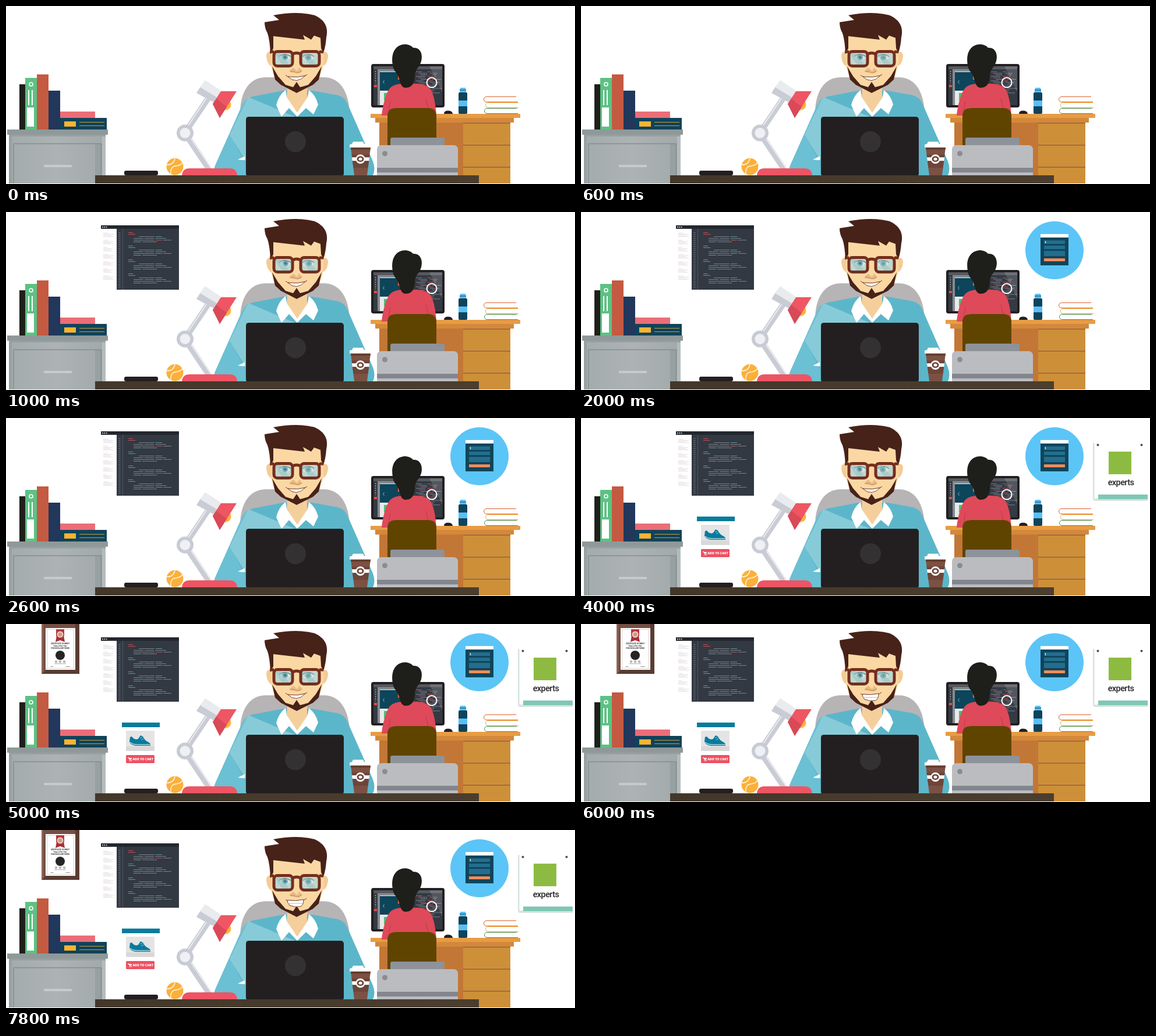
Recreate the animation shown at these times as an HTML page. Size 977 px wide and 307 px high, loop 9 s.

```html
<!DOCTYPE html>
<html lang="en">
<head>
<meta charset="utf-8">
<title>Busy office</title>
<style>
html, body { margin: 0; width: 100%; height: 100%; overflow: hidden; background: #fff; }
svg { display: block; }
text { text-anchor: middle; }
</style>
</head>
<body>
<svg width="977" height="307" viewBox="0 0 977 307">
<defs>
  <linearGradient id="wood"><stop stop-color="#43372a"/><stop offset="1" stop-color="#4b3e2f"/></linearGradient>
  <linearGradient id="steel"><stop stop-color="#a3abac"/><stop offset=".5" stop-color="#adb3b4"/><stop offset="1" stop-color="#a1a9aa"/></linearGradient>
  <clipPath id="aboveDesk"><path d="M0 0H977V292H0z"/></clipPath>
  <clipPath id="screen"><path d="M631 104H749V171H631z"/></clipPath>
</defs>

<g id="cabinet">
  <path fill="#8f9999" d="M2 213H175V222H2z"/>
  <path fill="url(#steel)" d="M5 222H171V306H5z"/>
  <path fill="#98a1a2" d="M5 222H171V225H5zM5 222H10V306H5zM153 238H163V306H153z"/>
  <path fill="none" stroke="#838d8e" stroke-width="1.5" d="M13 306V237.500H163.500V306"/>
  <path fill="#b4bbbc" d="M165 225H171V306H165z"/>
  <rect x="65" y="274" width="48" height="4" rx="1" fill="#c6cccd"/>
</g>

<g id="shelfBooks">
  <path fill="#1f1f1c" d="M23 135H33V213H23z"/>
  <path fill="#5cc283" d="M33 124H53V213H33z"/>
  <circle cx="43" cy="135" r="3" fill="none" stroke="#fff" stroke-width="1.700"/>
  <path fill="#fff" d="M38 145H40V171H38zM44 145H46V171H44zM36 175H48V208H36z"/>
  <path fill="#c45a41" d="M53 118H73V213H53z"/>
  <path fill="#21375b" d="M73 146H93V213H73z"/>
  <path fill="#eb6d77" d="M93 182H153V193H93z"/>
  <path fill="#10435a" d="M93 193H173V213H93z"/>
  <path fill="#fcb331" d="M100 199H120V208H100z"/>
  <path stroke="#c99d3a" d="M126 200.500H169M126 206.500H169"/>
</g>

<g id="backDesk">
  <path fill="#c27736" d="M641 201H785V306H641z"/>
  <path fill="#cd9039" d="M785 201H866V306H785z"/>
  <path stroke="#a56b42" stroke-width="2" d="M785 202H866M785 240H866M785 278H866"/>
  <path fill="#d4883a" d="M634 193H872V201H634z"/>
  <path fill="#e79c45" d="M626 186H883V193H626z"/>
  <path fill="#231f20" d="M752 186Q752 180.500 759 180.500T767 186z"/>
  <rect x="777" y="149" width="15" height="37" rx="2" fill="#10435a"/>
  <path fill="#58bff8" d="M780 141H789V143H790V149H779V143H780zM777 163H792V173H777z"/>
  <path fill="#10435a" d="M779 144.500H790V145.500H779z"/>
  <g fill="none">
    <path stroke="#d9602c" d="M876 156.500H825A4.500 4.500 0 0 0 825 165.500H879"/>
    <path stroke="#f5a92f" d="M879 166.500H828A4.500 4.500 0 0 0 828 175.500H880"/>
    <path stroke="#3f9460" d="M877 176.500H826A4.500 4.500 0 0 0 826 185.500H879"/>
  </g>
</g>

<g id="monitor">
  <rect x="627" y="100" width="126" height="75" rx="4" fill="#231f20"/>
  <path fill="#343a43" d="M631 104H749V171H631z"/>
  <g clip-path="url(#screen)">
    <path fill="#555960" d="M631 104H749V109H631z"/>
    <path fill="#868a8d" d="M638 109H695V171H638z"/>
    <path fill="#e9eaea" d="M642 113H695V171H642z"/>
    <path fill="#0d455b" d="M642 114H694V146H642z"/>
    <path fill="#4dbf79" d="M649 150H659V163H649z"/>
    <path fill="#e86b3a" d="M673 121H680V127H673z"/>
    <path fill="#e14b50" d="M632 136H637V140H632z"/>
    <path fill="none" stroke="#8fa9b4" d="M649.500 128L647.500 131L649.500 134"/>
    <path stroke="#9ba0a6" stroke-width="1.500" stroke-dasharray="2 2" d="M634.500 112V133"/>
    <g id="monitorCode"></g>
    <path fill="#fff" opacity=".15" d="M727 104H749V149z"/>
  </g>
  <circle cx="731" cy="132" r="8.500" fill="none" stroke="#fff" stroke-width="2"/>
</g>

<g id="colleague">
  <path fill="#de4a59" d="M645 189C647 170 653 147 661 140Q667 135 679 134H706Q720 135 726 140C734 147 738 170 739 189H725L720 176H666L657 189z"/>
  <path fill="none" stroke="#b93c4b" d="M660 164L657 181M721 160L726 181"/>
  <path fill="#1e1e1a" d="M664 102C660 78 671 66 686 66Q695 67 699 72C712 71 716 84 713 95C710 106 703 108 702 118C702 130 699 141 686 141C675 140 678 125 670 115Q665 110 664 102z"/>
  <path fill="#5f4400" d="M655 242V190Q655 176 669 176H725Q739 176 739 190V242z"/>
</g>

<g id="printer">
  <rect x="660" y="227" width="93" height="18" rx="3" fill="#8e9299"/>
  <path fill="#bbbcc0" d="M637 292V248Q637 240 645 240H768Q776 240 776 248V292z"/>
  <path fill="#83868f" d="M637 279H776V287H637z"/>
  <circle cx="650.500" cy="254.500" r="4.500" fill="#8a8c92"/>
</g>

<g id="lamp">
  <circle cx="377" cy="170" r="9.500" fill="#fcb33b"/>
  <g fill="none">
    <path stroke="#caccd5" stroke-width="10" d="M350 155L307 219L351 285"/>
    <path stroke="#f1f2f5" stroke-width="1.500" d="M347 155L307 215M311 219L353 281"/>
  </g>
  <circle cx="307.500" cy="219" r="14.500" fill="#c8cad4"/>
  <circle cx="307.500" cy="219" r="9" fill="#eff0f4"/>
  <path fill="#caccd5" d="M327 150L334 139L368 150L362 169z"/>
  <path fill="#e9ebef" d="M333 140L342 128L369 146L363 158z"/>
  <path fill="#ee5663" d="M369 147L396 147L367 193L355 169z"/>
  <path fill="#d94958" d="M361 160L379 174L367 193L355 169z"/>
</g>

<g id="man">
  <path fill="#b7b4b5" d="M402 185C402 145 420 123 446 123H546C572 123 590 146 590 190V210H402z"/>
  <path fill="#5cb6c9" d="M355 292Q357 279 361 271L405 172Q411 159 424 156L476 146H526L570 154Q582 157 587 170L630 268Q635 282 630 292z"/>
  <path fill="#6bc0d3" d="M355 292Q357 279 361 271L405 172Q409 162 416 158L385 222L410 270L412 292z"/>
  <path fill="#87cbd8" d="M416 157L496 191H412V268L384 222z"/>
  <path fill="#fff" d="M398 265L410 259V266z"/>
  <path fill="#f4cf9c" d="M483 140H517V154L518 157L500 186L482 157z"/>
  <path fill="#fff" d="M480 145Q468 154 464 171L473 191L486 176L500 191L515 176L528 187L536 170Q532 154 520 145L518 157L500 184L482 157z"/>
  <path fill="#f5cb95" d="M457 80Q447 76 447 87Q449 103 457 104zM542 80Q553 76 553 87Q551 103 542 104z"/>
  <path fill="#fbd8a3" d="M455 45H545V103L537 127Q524 140 499 149Q475 140 462 127L455 103z"/>
  <path fill="#472219" d="M457 104L462 127L472 136L499 150L527 136L537 127L542 104L532 121L519 136L505 140L499 131L493 140L480 136L467 121z"/>
  <path fill="#472219" d="M444 28L469 24L459 16Q500 8 530 16Q556 28 550 54Q549 69 545 81L541 73L540 55L529 51L524 58L510 50L513 58L459 52L459 73L454 83Q453 58 449 47Q444 38 444 28z"/>
  <path fill="#e8bb85" d="M493 106L486 113Q492 116 497 115Q504 118 509 112L503 106L500 112z"/>
  <path fill="none" stroke="#b98458" d="M488 113Q492 111 496 114Q501 117 507 112"/>
  <g id="lenses" fill="#bfd7d0">
    <rect x="460" y="79" width="32" height="25" rx="6"/>
    <rect x="506" y="79" width="32" height="25" rx="6"/>
  </g>
  <g fill="#dbe5de"><ellipse cx="479" cy="89" rx="9" ry="4.500"/><ellipse cx="519" cy="90" rx="9" ry="4.500"/></g>
  <g id="eyes">
    <g fill="#76a9b6"><circle cx="479" cy="88.500" r="5"/><circle cx="519" cy="89" r="5"/></g>
    <g fill="#44778d"><circle cx="479" cy="88.500" r="2.200"/><circle cx="519" cy="89" r="2.200"/></g>
  </g>
  <path fill="none" stroke="#728f8b" stroke-width="1.500" d="M469 87Q478 80 489 87M509 87Q519 80 529 87"/>
  <path fill="#8fc1c3" opacity=".5" d="M462 83L470 80L488 103H475zM507 83L516 80L535 103H522z"/>
  <g fill="none" stroke="#752e1c" stroke-width="5">
    <rect x="460" y="78.500" width="32" height="25" rx="6"/>
    <rect x="506" y="78.500" width="32" height="25" rx="6"/>
    <path d="M492 83Q499 79 506 83M453 79H460M538 79H545"/>
  </g>
  <g id="smile">
    <path fill="#fff" d="M484 122Q499 124 513 121Q500 137 484 122z"/>
    <path fill="none" stroke="#6e3a24" d="M480 119Q482 122 487 122Q500 124 514 120M484 122Q499 136 514 120L517 118"/>
  </g>
  <g id="grin">
    <path fill="#fff" stroke="#6e3a24" d="M483 121Q498 123 511 120Q511 129 506 132Q496 134 487 130Q483 126 483 121z"/>
    <path stroke="#b8b0a8" stroke-width=".8" d="M484 126.500H509"/>
    <path stroke="#6e3a24" d="M480 120L483 122M511 121L516 118"/>
  </g>
</g>

<g id="deskItems" clip-path="url(#aboveDesk)">
  <rect x="203" y="284" width="58" height="8" rx="3" fill="#231f20"/>
  <circle cx="290" cy="277" r="14.500" fill="#fbb03b"/>
  <path fill="none" stroke="#fff3d6" stroke-width="1.500" d="M276 274Q288 274 290 263M283 290Q282 277 291 276T303 270"/>
  <path fill="#ed5564" d="M302 292Q303 280 315 280H384Q396 280 397 292z"/>
  <rect x="412" y="191" width="168" height="103" rx="5" fill="#231f20"/>
  <circle cx="497" cy="234" r="18" fill="#343132"/>
  <path fill="#fff" d="M590 244V239L594 238L596 234H613L615 238L627 239V244z"/>
  <path fill="#7c5144" d="M592 244H626L620 292H598z"/>
  <path fill="#66402f" d="M592 244H626L625.500 248H592.500z"/>
  <path fill="#6e4539" d="M593.500 256H624.500L621.500 279H596.500z"/>
  <path fill="#fff" d="M594 261H624L623.500 267H594.700z"/>
  <circle cx="608.500" cy="264" r="8" fill="#fff"/>
  <ellipse cx="608.500" cy="264" rx="6" ry="5" fill="#6e4539"/>
  <ellipse cx="608.500" cy="264" rx="3" ry="2.500" fill="#fff"/>
</g>
<path fill="url(#wood)" d="M153 292H812V306H153z"/>

<g data-from="1">
  <path fill="#fff" d="M163 29H190V134H163z"/>
  <path fill="#333942" d="M190 29H297V134H190z"/>
  <path fill="#23272e" d="M163 23H297V29H163z"/>
  <path stroke="#c8cbcf" stroke-width="1.800" stroke-dasharray="1.800 1.500" d="M165 26H174"/>
  <path stroke="#50565f" d="M200.500 29V134"/>
  <path stroke="#747a83" stroke-width="3" stroke-dasharray="1 2.400" d="M195 35V131"/>
  <g id="editorCode"></g>
</g>

<g data-from="2">
  <circle cx="813" cy="66" r="50" fill="#5bc5f7"/>
  <path fill="#10455b" d="M789 43H837V92H789z"/>
  <path fill="#fff" d="M789 38H837V44H789z"/>
  <path fill="#236e8e" d="M795 49H831V55H795zM795 58H831V64H795zM795 67H831V76H795z"/>
  <path fill="#f28c59" d="M795 80H831V85H795z"/>
  <path fill="#fff" d="M797 50H798V54H797z"/>
</g>

<g data-from="3">
  <path fill="#087b9d" d="M199 170H264V178H199z"/>
  <path fill="#e4e4e4" d="M206 184H255V219H206z"/>
  <path fill="#d9d9d9" d="M206 211H255V219H206z"/>
  <path fill="#087b9d" d="M212 203L213 195L216 194Q221 201 227 198L231 192L235 194Q238 201 245 204Q249 206 248 210H224Q214 209 212 203z"/>
  <path fill="none" stroke="#fff" d="M213 204Q217 208 225 208H248"/>
  <path stroke="#9dc9d6" d="M230 197L234 195M232 200L236 198"/>
  <rect x="206" y="226" width="49" height="14" rx="1.500" fill="#ee5162"/>
  <path fill="#fff" d="M209 230H211L211.500 231H216L215 234H212z"/>
  <circle cx="212.500" cy="235.500" r=".9" fill="#fff"/><circle cx="215" cy="235.500" r=".9" fill="#fff"/>
  <text x="235" y="235.300" fill="#fff" font-family="'Open Sans', sans-serif" font-weight="800" font-size="5.300">ADD TO CART</text>
</g>

<g data-from="4">
  <path fill="#b6cdc6" opacity=".55" d="M879 43H881.500V139H973V143H883Q879 143 879 138z"/>
  <path fill="#7fc8b5" d="M888 132H973V140H888z"/>
  <circle cx="887.500" cy="46.500" r="2" fill="#4a4d52"/>
  <circle cx="962.500" cy="46.500" r="2" fill="#4a4d52"/>
  <rect x="906" y="58" width="39" height="39" fill="#8dbb42"/>
  <text x="927" y="116" fill="#252525" font-family="Roboto, sans-serif" font-weight="500" font-size="14.500" letter-spacing="-.6">experts</text>
</g>

<g data-from="5">
  <path fill="#745044" d="M61 0H126V86H61z"/>
  <path fill="#5a3b32" d="M126 0V86H61L69 79H119V0z"/>
  <path fill="#8b6659" d="M61 0H64V83L61 86z"/>
  <path fill="#fff" d="M68 7H119V79H68z"/>
  <path fill="none" stroke="#d8d5d2" d="M70.500 9.500H116.500V76.500H70.500z"/>
  <path fill="#a92f3b" d="M87 20L85 31L93 28L101 31L99 20z"/>
  <path fill="#bd3543" d="M86 9H100V21H86z"/>
  <circle cx="93" cy="18" r="5.500" fill="#e8d4c6"/>
  <circle cx="93" cy="18" r="3.500" fill="#cf9a7c"/>
  <g fill="#333" font-family="Roboto, sans-serif" font-weight="700" font-size="3">
    <text x="93" y="35">CERTIFICATE OF MERIT</text>
    <text x="93" y="39">Team of the Year</text>
    <text x="93" y="43">FOR EXCELLENT WORK</text>
    <text x="79" y="73.500" font-size="2.500">Date</text>
    <text x="106" y="73.500" font-size="2.500">Signed</text>
  </g>
  <circle cx="93" cy="54" r="8" fill="#252525"/>
  <g fill="#b9b9b9"><circle cx="86" cy="65" r="2.300"/><circle cx="93" cy="65" r="2.300"/><circle cx="100" cy="65" r="2.300"/></g>
  <path stroke="#999" stroke-width=".8" d="M83 68.500H103"/>
</g>
</svg>

<script>
const $ = id => document.getElementById(id);
const dash = (x, y, w, color) => `<path stroke="${color}" d="M${x} ${y + .5}h${w}"/>`;
const GREY = '#7b818a', RED = '#c24f56', TEAL = '#579a9f';

// Each block: a short heading followed by four indented lines.
function editorCode() {
  let out = '';
  [35, 58, 82, 106].forEach((y, i) => {
    const color = i ? TEAL : RED;
    out += dash(210, y, 8, color) + dash(210, y + 3, 12, color);
    out += dash(228, y + 7, 27, GREY) + dash(257, y + 7, 11, TEAL);
    out += dash(219, y + 10, 17, GREY) + dash(238, y + 10, 16, GREY) + dash(256, y + 10, 19, GREY);
    out += dash(219, y + 13, 36, GREY) + dash(257, y + 13, 11, i % 2 ? TEAL : RED) + dash(270, y + 13, 14, GREY);
    out += dash(219, y + 16, 13, TEAL) + dash(234, y + 16, 25, GREY);
  });
  for (let i = 0; i < 7; i++)
    [9, 18, 14, 18].forEach((w, j) => out += dash(167, 36 + i * 12.3 + j * 2, w - i % 3, '#e3dce1'));
  return out;
}

function monitorCode() {
  let out = '';
  for (let i = 0; i < 16; i++) {
    const x = 704 + i % 3 * 4, y = 113 + i * 2.6;
    out += dash(x, y, 10 + i * 5 % 9, i % 4 ? GREY : RED);
    out += dash(x + 20, y, 6 + i * 7 % 13, i % 3 ? GREY : RED);
  }
  return out;
}

$('editorCode').innerHTML = editorCode();
$('monitorCode').innerHTML = monitorCode();

const LOOP = 9000;
const gaze = [0, 1, 0, -1, -1, 0, 0];
const additions = [...document.querySelectorAll('[data-from]')];
const show = (el, on) => el.style.display = on ? '' : 'none';

function draw() {
  const step = Math.min(6, Math.floor(performance.now() % LOOP / 1000));
  additions.forEach(el => show(el, step >= +el.dataset.from));
  show($('smile'), step < 6);
  show($('grin'), step === 6);
  $('eyes').setAttribute('transform', `translate(${gaze[step]} 0)`);
  requestAnimationFrame(draw);
}
draw();
</script>
</body>
</html>
```
